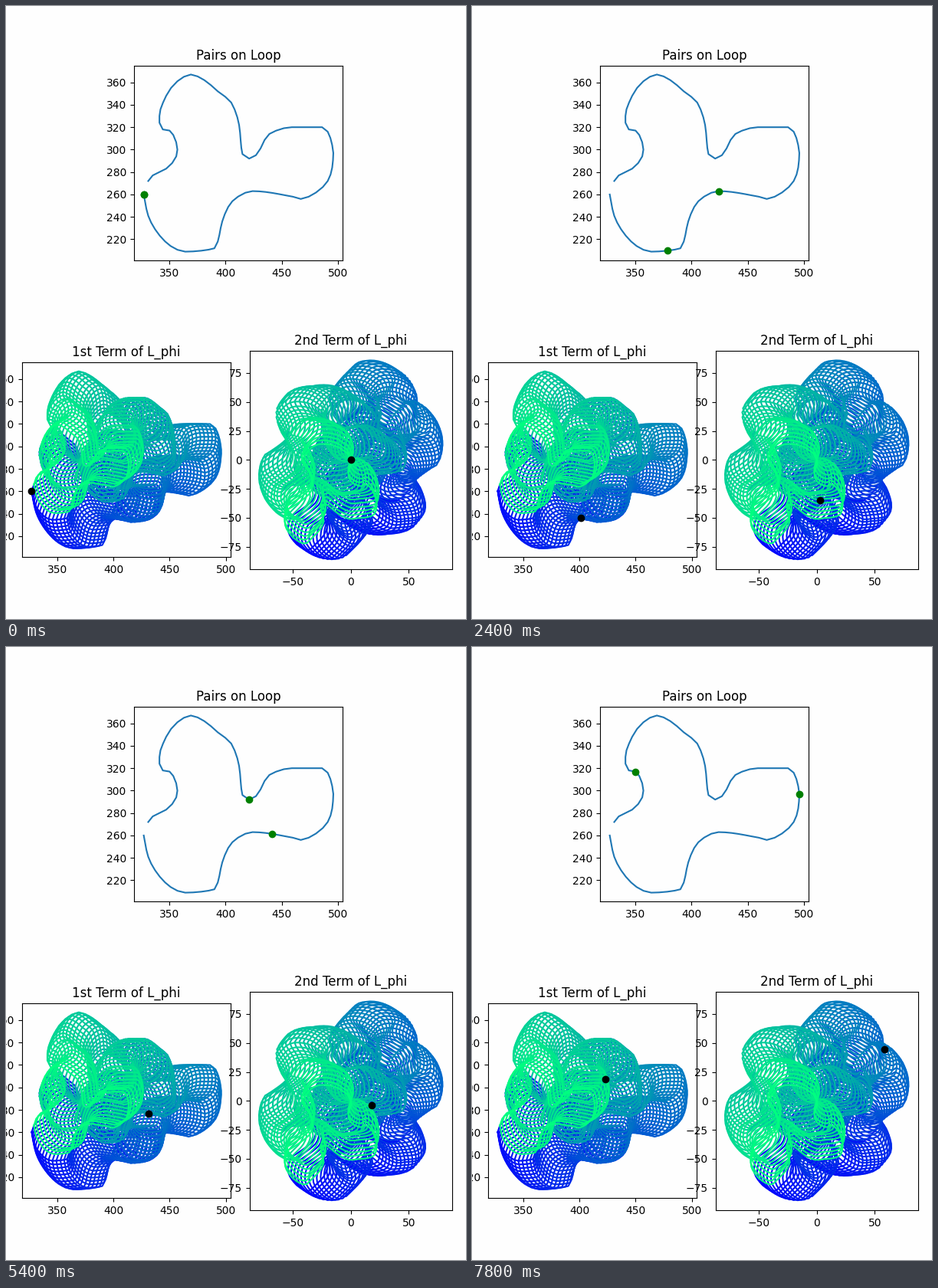
A matplotlib script that plays this animation: 600 by 800 pixels, repeating every 8000 ms.

```python
import numpy as np
import matplotlib.pyplot as plt
from matplotlib.animation import FuncAnimation
from matplotlib.collections import LineCollection

W, H, DPI = 600, 800, 100
FRAMES, INTERVAL = 40, 200
STEP = 6.6  # typical spacing of the loop's points
PAPER = "#fefefe"

# Key points of the hand-drawn loop: corners and turns only.
KNOTS = np.array([
    (327, 260), (331, 241), (351, 214), (364, 209), (390, 212), (393, 218),
    (397, 236), (406, 254), (424, 263), (460, 258), (467, 256), (474, 258),
    (491, 272), (495, 284), (496, 297), (495, 304), (491, 316), (486, 320),
    (459, 320), (439, 314), (427, 295), (421, 292), (415, 296), (412, 322),
    (405, 342), (393, 352), (381, 362), (369, 367), (357, 361), (347, 348),
    (341, 330), (341, 324), (344, 318), (350, 317), (357, 300), (356, 294),
    (347, 283), (335, 277), (331, 272),
], float)


def trace(knots):
    """Smooth path through the knots without overshoot, in near-even steps."""
    chords = np.diff(knots, axis=0)
    counts = np.rint(np.hypot(*chords.T) / STEP).astype(int)
    slopes = chords / counts[:, None]

    # Harmonic mean of neighbouring slopes, zero where they change sign.
    a, b = slopes[:-1], slopes[1:]
    total = np.where(a * b > 0, a + b, 1)
    inner = np.where(a * b > 0, 2 * a * b / total, 0)
    tangents = np.vstack([slopes[:1], inner, slopes[-1:]])

    pts = [knots[0]]
    for k, n in enumerate(counts):
        u = (np.arange(1, n + 1) / n)[:, None]
        ease = u * u * (3 - 2 * u)
        pts.extend(knots[k] + ease * chords[k]
                   + n * u * (1 - u) ** 2 * tangents[k]
                   - n * u * u * (1 - u) * tangents[k + 1])
    return np.array(pts)


def midpoint(a, b):
    return (a + b) / 2


def half_diff(a, b):
    """Half of b - a, turned by 225 degrees."""
    d = (b - a) / 2
    x, y = d[..., 0], d[..., 1]
    return np.stack([y - x, -x - y], axis=-1) / np.sqrt(2)


loop = trace(KNOTS)
closed = np.vstack([loop, loop[:1]])
colors = plt.cm.winter(np.linspace(0, 1, len(loop)))

fig = plt.figure(figsize=(W / DPI, H / DPI), dpi=DPI, facecolor=PAPER)


def panel(title, center, scale, xlim, ylim, xticks, yticks):
    """Axes centred on a pixel, with equal scale in pixels per unit."""
    w, h = np.ptp(xlim) * scale, np.ptp(ylim) * scale
    cx, cy = center
    ax = fig.add_axes([(cx - w / 2) / W, 1 - (cy + h / 2) / H, w / W, h / H])
    ax.set_facecolor(PAPER)
    ax.set_title(title)
    ax.set(xlim=xlim, ylim=ylim, xticks=xticks, yticks=yticks)
    return ax


def mesh(ax, term):
    curves = [term(p, closed) for p in loop]
    ax.add_collection(LineCollection(
        curves, colors=colors, linewidths=1.5, zorder=2,
        capstyle="projecting", joinstyle="round"), autolim=False)


def dots(ax, color):
    return ax.plot([], [], "o", color=color, zorder=3)[0]


loop_view = dict(scale=1.4632, xlim=(318.55, 504.45), ylim=(201.1, 374.9),
                 xticks=range(350, 501, 50), yticks=range(220, 361, 20))

ax_loop = panel("Pairs on Loop", (303.3, 205.0), **loop_view)
ax_mid = panel("1st Term of L_phi", (157.1, 592.3), **loop_view)
ax_diff = panel("2nd Term of L_phi", (449.7, 592.3), 1.512,
                (-87.3, 87.3), (-94.25, 94.25),
                (-50, 0, 50), range(-75, 76, 25))

ax_loop.plot(*loop.T, color="C0", lw=1.5)
mesh(ax_mid, midpoint)
mesh(ax_diff, half_diff)

pair = dots(ax_loop, "green")
mid_dot = dots(ax_mid, "black")
diff_dot = dots(ax_diff, "black")


def update(i):
    a, b = loop[i], loop[2 * i]
    pair.set_data([a[0], b[0]], [a[1], b[1]])
    for dot, (x, y) in ((mid_dot, midpoint(a, b)), (diff_dot, half_diff(a, b))):
        dot.set_data([x], [y])
    return pair, mid_dot, diff_dot


anim = FuncAnimation(fig, update, frames=FRAMES, interval=INTERVAL,
                     repeat=True, repeat_delay=0)
plt.show()
```
